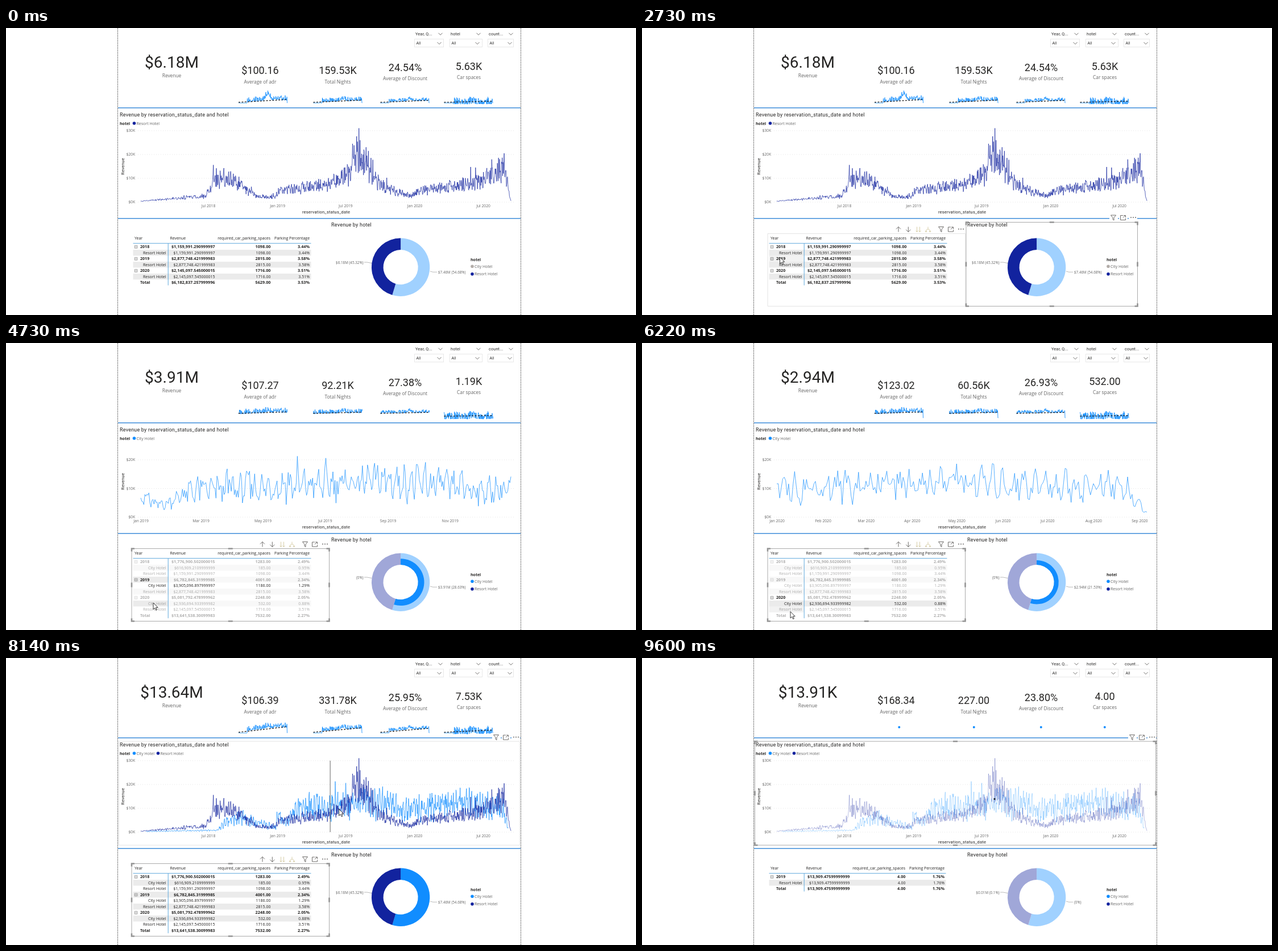
Animation, 1108 px wide and 506 px high, one loop 9800 ms. Source, as an HTML page:

```html
<!DOCTYPE html>
<html lang="en">
<head>
<meta charset="utf-8">
<title>Hotel revenue dashboard</title>
<style>
html,body{margin:0;width:100%;height:100%;overflow:hidden;background:#fff}
svg{display:block;width:1108px;height:506px}
text{font-family:"Open Sans","Noto Sans",sans-serif;fill:#252423;white-space:pre}
.d{font-family:Roboto,"Noto Sans",sans-serif}
.sp{letter-spacing:.2px}
.e{text-anchor:end}.m{text-anchor:middle}.b{font-weight:700}
.g{fill:#666}.dim{opacity:.36}
.ln{fill:none;stroke-linejoin:round}
.ic{fill:none;stroke:#605e5c;stroke-width:.9}
</style>
</head>
<body>
<svg viewBox="0 0 1108 506">
<g id="base"></g><g id="cards"></g><g id="chart"></g><g id="table"></g><g id="donut"></g>
<g id="frames"></g><rect id="hover" x="223.5" width="61" height="10.5" fill="#000" opacity=".05"/>
<path id="cross" stroke="#555" stroke-width=".9"/>
<path id="cursor" d="M0 0V11.6L2.7 9.1 4.6 13.2 6.4 12.4 4.6 8.4H8.2Z" fill="#fff" stroke="#222" stroke-width=".9"/>
</svg>
<script>
const LOOP = 9800, CITY = '#118DFF', RESORT = '#12239E', GREY = '#B3ADA9';
const $ = id => document.getElementById(id);
const T = (x, y, s, size = 7, cls = '', more = '') =>
  `<text x="${x}" y="${(y + size * .36).toFixed(2)}" font-size="${size}" class="${cls}" ${more}>${s}</text>`;
const R = (x, y, w, h, fill, more = '') => `<rect x="${x}" y="${y}" width="${w}" height="${h}" fill="${fill}" ${more}/>`;
const P = (d, more) => `<path d="${d}" ${more}/>`;
const dot = (x, y, r, fill) => `<circle cx="${x}" cy="${y}" r="${r}" fill="${fill}"/>`;
const rnd = (i, seed) => { const v = Math.sin(i * 12.9898 + seed * 78.233) * 43758.5453; return v - Math.floor(v); };
const mix = (a, b, f) => a + (b - a) * f;

// Each click filters the page; the clicked part answers at once, the others after their delay.
// States: hotel letter (C, R, A for all, Y for both) and an optional year; P is a single point.
const clicks = [[0, 'R'], [900, 'C', 'donut'], [1760, 'R', 'donut'], [2900, 'Y19', 'table'], [4170, 'C19', 'table'],
  [5000, 'C20', 'table'], [6300, 'R20', 'table'], [6970, 'A', 'table'], [8890, 'P', 'chart']];
const delay = { cards: 200, chart: 330, table: 330, donut: 420 }, LOAD = 210;
function stateOf(part, t) {
  let state;
  for (const [t0, key, from] of clicks) {
    const age = t - t0 - (from && from != part ? delay[part] : 0);
    if (age >= 0) state = part == 'table' && from == 'donut' && age < LOAD ? key + 'load' : key;
  }
  return state;
}
// d donut, t table, c chart; capital when selected
const focus = [[0, ''], [450, 'd'], [900, 'D'], [2320, 'Dt'], [2900, 'T'], [8000, 'Tc'], [8890, 'C']];
const focusAt = t => focus.filter(f => f[0] <= t).pop()[1];

// Daily revenue in thousands; day 0 is 1 Jan 2019. Key points are day, usual level.
const cityLevel = [[-349, .3], [-160, .8], [-135, 4.5], [-100, 6], [-50, 4], [-4, 2], [0, 8], [14, 4.5], [26, 5], [50, 9.5],
  [245, 13], [340, 9.5], [480, 13], [600, 10.5], [614, 1]];
const resortLevel = [[-363, .4], [-190, 2.6], [-170, 9], [-130, 11], [-57, 2.6], [-5, 2], [0, 4.5], [154, 8.5], [192, 13],
  [200, 19], [238, 18], [247, 11], [290, 6], [357, 2.6], [368, 4.5], [531, 8.5], [604, 14], [621, .5]];
function series(keys, seed, week, jitter) {
  const out = [];
  for (let i = 0, d = keys[0][0]; d <= keys[keys.length - 1][0]; d++) {
    if (d > keys[i + 1][0]) i++;
    const [[d0, v0], [d1, v1]] = [keys[i], keys[i + 1]];
    const wave = week * Math.sin(d * 2 * Math.PI / 7 + seed) + jitter * (rnd(d, seed) - .55);
    const burst = rnd(d, seed + 9) > .93 ? .5 * rnd(d, seed + 4) : 0;
    out.push([d, mix(v0, v1, (d - d0) / (d1 - d0)) * (1 + wave + burst)]);
  }
  return out;
}
const city = series(cityLevel, 2, .24, .72), resort = series(resortLevel, 5, .1, .7);

// Chart
const start19 = Date.UTC(2019, 0), dayOf = (y, m) => (Date.UTC(y, m) - start19) / 864e5;
const names = 'Jan Feb Mar Apr May Jun Jul Aug Sep Oct Nov Dec'.split(' ');
function viewOf(key) {
  const year = key.slice(1), one = key[0], who = { C: 'C', R: 'R' }[one] || 'CR';
  const from = year ? dayOf('20' + year, 0) : one == 'C' ? -349 : -363;
  const to = year == '19' ? 364 : one == 'C' ? 614 : 621;
  const step = { 19: 2, 20: 1 }[year] || 6, top = one == 'C' || key == 'R20' ? 20 : 30, ticks = [];
  for (let m = 0; m < 36; m += step) {
    const d = dayOf(2018, m);
    if (d >= from && d <= to - 3) ticks.push([d, `${names[m % 12]} ${2018 + Math.floor(m / 12)}`]);
  }
  return { who, from, to, ticks, top };
}
function drawChart(key) {
  const { who, from, to, ticks, top } = viewOf(key);
  const X = d => 237 + (d - from) * 651 / (to - from), Y = n => 307 - n * (top == 30 ? 4.2 : 5.05);
  let s = T(200, 152.5, 'Revenue by reservation_status_date and hotel', 9, 'd sp') + T(200, 168, 'hotel', 7, 'b');
  [...who].forEach((w, i) => {
    s += dot(225.5 + i * 42, 168, 2.8, w == 'C' ? CITY : RESORT) +
      T(229.5 + i * 42, 168, w == 'C' ? 'City Hotel' : 'Resort Hotel', 7, 'g');
  });
  for (let n = 0; n <= top; n += 10)
    s += T(227, Y(n), `$${n}K`, 6.7, 'e g') + P(`M232 ${Y(n)}H893`, 'stroke="#ddd" stroke-width=".8" stroke-dasharray="1 3"');
  for (const [d, name] of ticks) s += T(X(d) + .5, 313.5, name, 6.7, 'm g');
  s += T(563, 324, 'reservation_status_date', 7.5, 'd sp m') +
    T(0, 0, 'Revenue', 7.5, 'd sp m', 'transform="translate(205 244) rotate(-90)"');
  for (const w of who) {
    const pts = (w == 'C' ? city : resort).filter(p => p[0] >= from && p[0] <= to);
    s += P('M' + pts.map(([d, n]) => X(d).toFixed(1) + ' ' + Y(n).toFixed(1)).join('L'),
      `class="ln" stroke="${w == 'C' ? CITY : RESORT}" stroke-width=".7" opacity="${key == 'P' ? .42 : 1}"`);
  }
  return s + (key == 'P' ? dot(X(216), Y(13.91), 1.6, '#222') : '');
}

// Cards
const cardText = {
  R: ['$6.18M', '$100.16', '159.53K', '24.54%', '5.63K'], C: ['$7.46M', '$110.50', '172.24K', '26.88%', '1.90K'],
  A: ['$13.64M', '$106.39', '331.78K', '25.95%', '7.53K'], Y19: ['$6.78M', '$102.84', '170.35K', '26.05%', '4.00K'],
  C19: ['$3.91M', '$107.27', '92.21K', '27.38%', '1.19K'], C20: ['$2.94M', '$123.02', '60.56K', '26.93%', '532.00'],
  R20: ['$2.15M', '$112.46', '51.20K', '24.71%', '1.72K'], P: ['$13.91K', '$168.34', '227.00', '23.80%', '4.00']
};
const cardSpots = [[291.5, 60, 83.5, 'Revenue'], [447, 75, 95, 'Average of adr'], [583.5, 75, 95, 'Total Nights'],
  [702, 69.5, 89, 'Average of Discount'], [814, 68, 87, 'Car spaces']];
const sparkX = [409, 540.5, 658.5, 770.5], rises = [10, 8, 7, 4], spreads = [9, 8, 6, 14];
function spark(i, key) {
  const full = key.length == 1, x = sparkX[i], bars = i == 3;
  const rise = rises[i] * (!full ? .25 : key == 'R' ? .5 : 1);
  const y0 = full ? 131 : bars ? 129 : 124, bump = key == 'R' && !i ? 11 : 3;
  let d = '';
  for (let n = 0; n <= 172; n++) {
    const u = n / 172, r = rnd(n, i + 3);
    let y = y0 + (bars ? 2 : -1) - rise * Math.sqrt(u) - bump * Math.exp(-(((u - .6) / .06) ** 2)) - spreads[i] * (r ** 2 - .3);
    if (full && u < .18) y = 132.5 - r * .6;
    if (u > .99 && !key.endsWith('19')) y = 132;
    d += `${n ? 'L' : 'M'}${(x + u * 86).toFixed(1)} ${Math.max(110.5, Math.min(134, y)).toFixed(1)}`;
  }
  return P(d, `class="ln" stroke="${CITY}" stroke-width=".85"`) +
    P(`M${x} ${y0}l86 ${-rise}`, 'stroke="#222" stroke-width="1.3" stroke-dasharray="3 2.4"');
}
function drawCards(key) {
  return cardSpots.map(([x, y, yl, label], i) =>
    T(x, y, cardText[key][i], i ? 18 : 28, 'd m') + T(x, yl, label, 8.4, 'm g')).join('') +
    sparkX.map((x, i) => key == 'P' ? dot(x + 43.3, 122, 2, CITY) : spark(i, key)).join('');
}

// Table
const cells = {
  2018: { A: ['$1,776,900.502000015', '1283.00', '2.49%'], C: ['$616,909.2109999999', '185.00', '0.95%'], R: ['$1,159,991.290999997', '1098.00', '3.44%'] },
  2019: { A: ['$6,782,845.31999985', '4001.00', '2.34%'], C: ['$3,905,096.897999997', '1186.00', '1.29%'], R: ['$2,877,748.421999983', '2815.00', '3.58%'] },
  2020: { A: ['$5,081,792.478999962', '2248.00', '2.05%'], C: ['$2,936,694.933999982', '532.00', '0.88%'], R: ['$2,145,097.545000015', '1716.00', '3.51%'] },
  Total: { A: ['$13,641,538.30099983', '7532.00', '2.27%'], C: ['$7,458,701.042999978', '1903.00', '1.08%'], R: ['$6,182,837.257999996', '5629.00', '3.53%'] }
};
const point = ['$13,909.47599999999', '4.00', '1.76%'];
const rowY = i => 385.6 + i * 10.52;
function drawTable(key) {
  const load = key.endsWith('load'), one = key[0], year = load ? '' : key.slice(1), both = year || key == 'A';
  const narrow = key == 'P' ? 2 : load ? 8 : 0, edge = load ? 278 : 285, right = 536.5 - narrow, rows = [];
  if (key == 'P') rows.push(['2019', point, 1], ['Resort Hotel', point], ['Total', point, 1]);
  else for (const name in cells) {
    const c = cells[name];
    rows.push([name, c[both ? 'A' : one], 1]);
    if (name == 'Total') continue;
    if (both || one == 'C') rows.push(['City Hotel', c.C]);
    if (both || one == 'R') rows.push(['Resort Hotel', c.R]);
  }
  const head = year && (year - 18) * 3;
  const isLit = i => !year || (one == 'Y' ? i >= head && i < head + 3 : i == head + (one == 'C' ? 1 : 2));
  let s = T(226, 370.5, 'Year', 6.9) + T(load ? 281 : 288.5, 370.5, 'Revenue', 6.9) +
    T(465 - narrow, 370.5, 'required_car_parking_spaces', 6.9, 'e') + T(534 - narrow, 370.5, 'Parking Percentage', 6.9, 'e');
  rows.forEach(([name, vals, bold], i) => {
    const y = rowY(i), lit = isLit(i), nameLit = lit || i === head, total = name == 'Total';
    const b = bold ? 'b ' : '', dim = lit ? '' : 'dim ', nameDim = nameLit ? '' : 'dim ';
    if (i % 2 && !total) {
      s += R(223.5, y - 5.2, edge - 223.5, 10.5, '#ebebeb', `class="${nameDim}"`);
      if (!load) s += R(edge, y - 5.2, right - edge, 10.5, '#ebebeb', `class="${dim}"`);
    }
    if (bold && !total)
      s += P(`M226.3 ${y - 2}h4.6v4.6h-4.6zM227.3 ${y + .3}h2.6`, `fill="none" stroke="#777" stroke-width=".7" class="${nameDim}"`);
    s += bold ? T(236, y, name, 7.1, b + nameDim) : T(edge - 3.5, y, name, 7, 'e ' + nameDim);
    if (!load) [367.5, 465.5, 534].forEach((x, j) => { s += T(x - narrow, y, vals[j], bold ? 7.25 : 7, 'e ' + b + dim); });
  });
  return s + P(`M223.5 379.7H${right}M${edge}.2 380V${rowY(rows.length - 1) + 5}`, 'stroke="#5FA8DC" stroke-width="1" fill="none"');
}

// Donut
const millions = s => s.replace(/[$,]/g, '') / 1e6;
const whole = { C: millions(cells.Total.C[0]), R: millions(cells.Total.R[0]) }, sum = whole.C + whole.R, share = whole.C / sum;
function ring(a, b, r0, r1, fill) {
  const p = (u, r) => `${694.1 + r * Math.sin(u * 2 * Math.PI)} ${421.7 - r * Math.cos(u * 2 * Math.PI)}`, big = b - a > .5 ? 1 : 0;
  return P(`M${p(a, r1)}A${r1} ${r1} 0 ${big} 1 ${p(b, r1)}L${p(b, r0)}A${r0} ${r0} 0 ${big} 0 ${p(a, r0)}Z`, `fill="${fill}"`);
}
function drawDonut(key) {
  const year = key.slice(1), q = 30.6, w = 20.6;
  // Highlighted part and labelled amount of one hotel
  const parts = h => {
    const on = key[0] == h || 'AY'.includes(key[0]);
    if (key == 'P') return [0, h == 'R' ? millions(point[0]) : 0];
    if (!year) return [on ? 1 : 0, whole[h]];
    const v = on ? millions(cells['20' + year][h][0]) : 0;
    return [v / whole[h], v];
  };
  const label = v => v ? `$${v.toFixed(2)}M (${+(v / sum * 100).toFixed(2)}%)` : '(0%)';
  const [c, cv] = parts('C'), [r, rv] = parts('R');
  return T(572, 347, 'Revenue by hotel', 9, 'd sp') +
    ring(0, share, q, q + w, '#A0D1FF') + ring(share, 1, q, q + w, '#A0A7D8') +
    (c ? ring(0, share, q, q + w * c, CITY) : '') + (r ? ring(share, 1, q, q + w * r, RESORT) : '') +
    P('M630 413H635L643 414.5M746 429L751 430.3H758', 'fill="none" stroke="#aaa" stroke-width=".8"') +
    T(628.5, 413.3, label(rv), 6.3, 'e g') + T(760, 430.3, label(cv), 6.3, 'g') +
    T(817, 408, 'hotel', 7, 'b') + dot(820, 420.3, 2.8, key == 'R' ? GREY : CITY) + T(824, 420.3, 'City Hotel', 7, 'g') +
    dot(820, 433.8, 2.8, key == 'C' ? GREY : RESORT) + T(824, 433.8, 'Resort Hotel', 7, 'g');
}

// Selection frames and their toolbars
function tools(x, y) {
  return [-7, 10, 27].map(a => R(x + a, y - 5, 15, 10, '#fff')).join('') +
    P(`M${x - 4.5} ${y - 4.5}h9l-3.5 4.5v4.5l-2-1.5v-3z`, 'class="ic"') +
    P(`M${x + 17} ${y - 4}h-4.5v8h9v-3M${x + 17} ${y}l4-4m-3 0h3.5v3.5`, 'class="ic"') +
    [31, 35, 39].map(a => dot(x + a, y - .5, .9, '#605e5c')).join('');
}
function frame(x0, y0, x1, y1, solid) {
  const mx = (x0 + x1) / 2, my = (y0 + y1) / 2;
  let s = P(`M${x0} ${y0}H${x1}V${y1}H${x0}Z`, `fill="none" stroke="${solid ? '#aaa' : '#ddd'}" stroke-width="${solid ? 1 : .8}"`);
  if (solid) s += P(`M${x0} ${y0 + 5}V${y0}H${x0 + 5}M${x1 - 5} ${y0}H${x1}V${y0 + 5}M${x1} ${y1 - 5}V${y1}H${x1 - 5}M${x0 + 5} ${y1}H${x0}V${y1 - 5}` +
    `M${mx - 4} ${y0}h8M${mx - 4} ${y1}h8M${x0} ${my - 4}v8M${x1} ${my - 4}v8`, 'fill="none" stroke="#949494" stroke-width="2.6"');
  return s;
}
const sortIcons = P('M451 359.5V350.5m-4 4l4-4 4 4M468.3 350.5v9m-4-4l4 4 4-4', 'class="ic"') +
  P('M483.5 350.5v9m-2-2l2 2 2-2M488.5 350.5v9m-2-2l2 2 2-2M503 350.5v4l-3.5 2v3.5m3.5-5.5l3.5 2v3.5m-8.5-2l1.5 2 1.5-2m4 0l1.5 2 1.5-2', 'class="ic" style="stroke:#d3c9a0"');
function drawFrames(key) {
  let s = '';
  if (/t/i.test(key)) s += frame(221, 362.5, 568.5, 490.5, key[0] == 'T') + sortIcons + tools(526, 355);
  if (/d/i.test(key)) s += frame(570, 342.5, 871.5, 490.5, key[0] == 'D') + tools(829, 334.5);
  if (/c/i.test(key)) s += frame(198.5, 147, 903.5, 330, key == 'C') + tools(862, 140);
  return s;
}

// Fixed page parts
const chevron = (x, y) => P(`M${x - 3.5} ${y - 1.7}l3.5 3.5 3.5-3.5`, 'class="ic"');
$('base').innerHTML = P('M196.5 0V506M905.5 0V506', 'stroke="#333" stroke-width="1" stroke-dasharray="1.5 1.5"') +
  P('M197 140.8H905M197 335.7H905', 'stroke="#3E8EDA" stroke-width="1.6"') +
  [[718, 51, 'Year, Q...', 764], [780, 57, 'hotel', 831], [847, 45, 'count...', 888]].map(([x, w, name, c]) =>
    T(x + 2, 10.5, name, 7.2, 'd sp') + chevron(c, 10.5) + R(x + .5, 19.5, w, 14, 'none', 'stroke="#e8e8e8"') +
    T(x + 3.5, 26.8, 'All', 7) + chevron(c - 2, 26.8)).join('');

// Cursor stops: arrive, leave, x, y
const stops = [[70, 70, 948, 392], [800, 1000, 722, 424], [1370, 1900, 659, 393.5], [2530, 3820, 242.5, 404],
  [4030, 4400, 258, 428], [4660, 5960, 259, 458], [6220, 7400, 261, 473.5], [8140, 8140, 585.5, 266.5],
  [8400, 8620, 606, 252], [8830, 9130, 620, 247], [9530, 9530, 1062, 490]];
function cursorAt(t) {
  const i = stops.findIndex(s => t < s[0]);
  if (i < 1) return null;
  const [, leave, x0, y0] = stops[i - 1], [arrive, , x1, y1] = stops[i];
  const f = Math.max(0, (t - leave) / (arrive - leave));
  return [mix(x0, x1, f), mix(y0, y1, f)];
}

const draw = { cards: drawCards, chart: drawChart, table: drawTable, donut: drawDonut, frames: drawFrames };
const shown = {};
const show = (el, on) => el.setAttribute('visibility', on ? 'visible' : 'hidden');
function render(t) {
  for (const part in draw) {
    const key = part == 'frames' ? focusAt(t) : stateOf(part, t);
    if (shown[part] !== key) $(part).innerHTML = draw[part](shown[part] = key);
  }
  const c = cursorAt(t);
  show($('cursor'), c);
  if (c) $('cursor').setAttribute('transform', `translate(${c})`);
  const row = c ? Math.round((c[1] - 385.6) / 10.52) : -1;
  const over = c && c[0] > 223 && c[0] < 285 && row >= 0 && row < 9;
  show($('hover'), over);
  if (over) $('hover').setAttribute('y', rowY(row) - 5.2);
  // The crosshair trails the cursor a little.
  const late = cursorAt(t - 36), inPlot = late && late[0] > 237 && late[0] < 890 && late[1] < 307;
  show($('cross'), inPlot);
  if (inPlot) $('cross').setAttribute('d', `M${late[0]} 181V307`);
}
const start = performance.now();
(function tick() {
  render((performance.now() - start) % LOOP);
  requestAnimationFrame(tick);
})();
</script>
</body>
</html>
```
